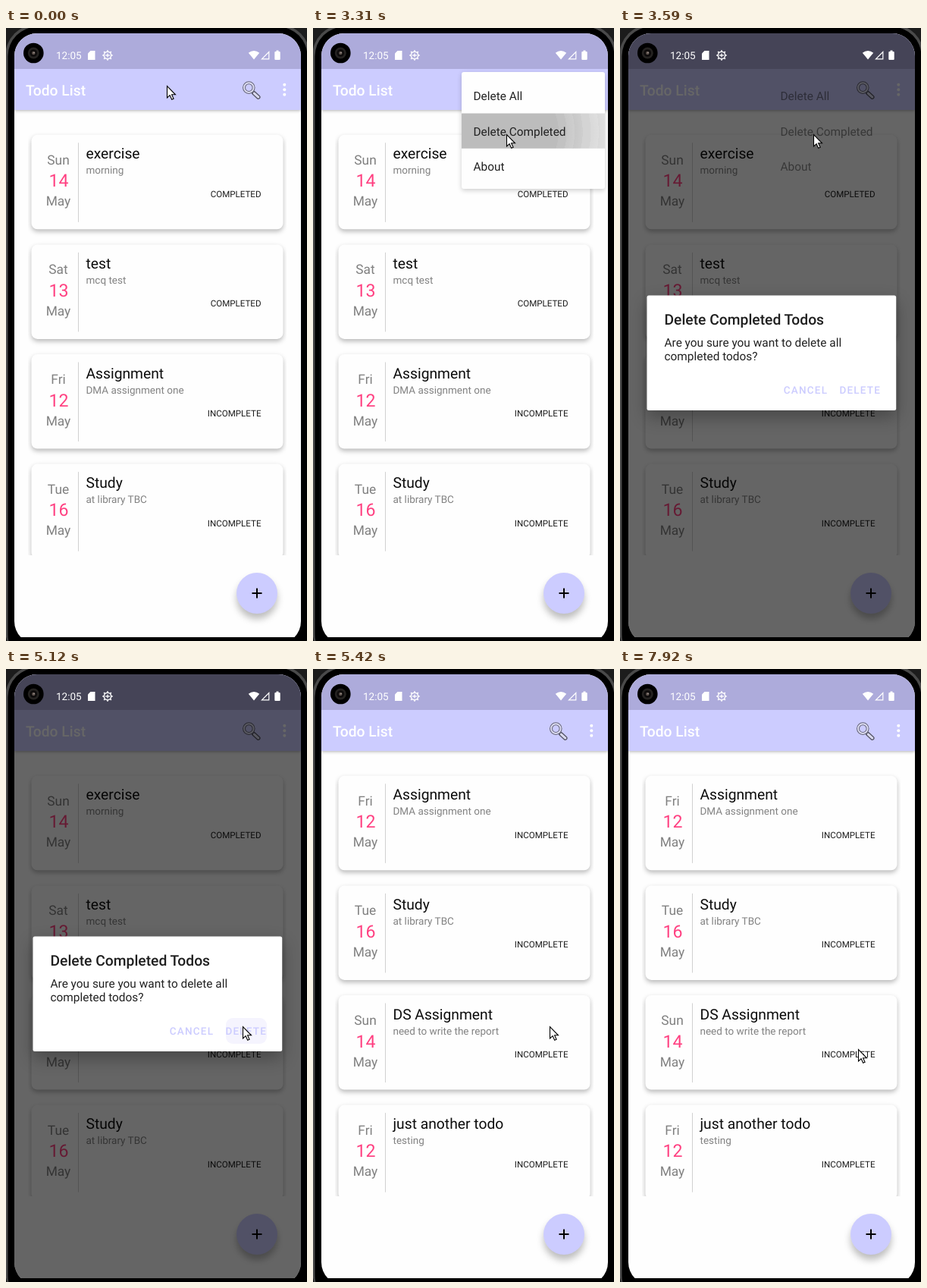
Write an HTML page with a canvas that moves like this. It is 397 by 808 pixels and loops after 8 s.

```html
<!DOCTYPE html>
<html lang="en">
<head>
<meta charset="utf-8">
<title>Todo list</title>
<style>
html, body { margin: 0; width: 100%; height: 100%; overflow: hidden; background: #000; }
canvas { display: block; }
</style>
</head>
<body>
<canvas id="stage" width="397" height="808"></canvas>
<script>
const ctx = document.getElementById('stage').getContext('2d');
const LOOP = 8000;
const SP = 27 / 28; // pixels per density-independent unit
const LAVENDER = '#ccccff';

const before = [
  ['Sun', 14, 'exercise', 'morning', 'COMPLETED'],
  ['Sat', 13, 'test', 'mcq test', 'COMPLETED'],
  ['Fri', 12, 'Assignment', 'DMA assignment one', 'INCOMPLETE'],
  ['Tue', 16, 'Study', 'at library TBC', 'INCOMPLETE']
];
const after = [
  before[2],
  before[3],
  ['Sun', 14, 'DS Assignment', 'need to write the report', 'INCOMPLETE'],
  ['Fri', 12, 'just another todo', 'testing', 'INCOMPLETE']
];

// Each entry: start time, pointer x, pointer y
const pointerSteps = [
  [0, 212, 76], [150, 284, 76], [300, 319, 80], [420, 342, 82], [570, 345, 85],
  [720, 358, 85], [840, 368, 85], [2370, 322, 114], [2490, 283, 135],
  [2640, 255, 140], [3850, 255, 161], [4010, 264, 320], [4140, 277, 455],
  [4290, 302, 467], [4410, 312, 470], [4560, 312, 471], [7760, 312, 480],
  [7920, 314, 501]
];

function text(str, x, y, size, color, { weight = 400, align = 'left', spacing = 0 } = {}) {
  ctx.font = `${weight} ${size * SP}px Roboto, sans-serif`;
  ctx.textRendering = 'geometricPrecision'; // keeps fractional glyph advances
  ctx.letterSpacing = spacing + 'px';
  ctx.textAlign = align;
  ctx.fillStyle = color;
  ctx.fillText(str, x, y);
}

function rect(x, y, w, h, color) {
  ctx.fillStyle = color;
  ctx.fillRect(x, y, w, h);
}

function roundRect(x, y, w, h, r, color) {
  ctx.beginPath();
  ctx.roundRect(x, y, w, h, r);
  ctx.fillStyle = color;
  ctx.fill();
}

function circle(x, y, r, color) {
  ctx.beginPath();
  ctx.arc(x, y, r, 0, Math.PI * 2);
  ctx.fillStyle = color;
  ctx.fill();
}

function line(x1, y1, x2, y2, width, color) {
  ctx.beginPath();
  ctx.moveTo(x1, y1);
  ctx.lineTo(x2, y2);
  ctx.lineWidth = width;
  ctx.strokeStyle = color;
  ctx.stroke();
}

function polygon(points) {
  ctx.beginPath();
  points.forEach(([x, y]) => ctx.lineTo(x, y));
  ctx.closePath();
}

function withState(draw) {
  ctx.save();
  draw();
  ctx.restore();
}

function withShadow(alpha, blur, dy, draw) {
  withState(() => {
    ctx.shadowColor = `rgba(0,0,0,${alpha})`;
    ctx.shadowBlur = blur;
    ctx.shadowOffsetY = dy;
    draw();
  });
}

function drawPhone() {
  rect(0, 0, 397, 808, '#1c1c1c');
  roundRect(-1, -5, 402, 840, 42, '#4a4a4a');
  roundRect(2.5, -1.5, 395, 840, 38.5, '#000');
}

function clipScreen() {
  ctx.beginPath();
  ctx.rect(11, 7, 378, 796);
  ctx.clip();
  ctx.beginPath();
  ctx.roundRect(11, 7, 378, 805, 30);
  ctx.clip();
}

function drawSearchIcon() {
  ctx.translate(0.8, 0.6);
  ctx.lineCap = 'round';
  line(326, 85, 332, 90.5, 5.5, '#555566');
  line(326.5, 85.5, 332, 90.5, 3, '#d9d9ee');
  for (const [width, color] of [[4, '#66667a'], [2, '#dcdcf2']]) {
    ctx.beginPath();
    ctx.arc(319.5, 78, 6.3, 0, Math.PI * 2);
    ctx.lineWidth = width;
    ctx.strokeStyle = color;
    ctx.stroke();
  }
}

function drawCard([day, date, title, note, status], y) {
  withShadow(0.28, 6, 3, () => roundRect(33.5, y, 332, 124.5, 8, '#fefefe'));
  rect(95, y + 10.5, 1, 104.5, '#d0d0d0');
  const centered = { align: 'center' };
  text(day, 69, y + 39, 18, '#808080', centered);
  text(date, 69.5, y + 68.5, 24, '#ff4081', centered);
  text('May', 69, y + 93.5, 18, '#808080', centered);
  text(title, 105.5, y + 31.5, 20, '#0c0c0c');
  text(note, 105.5, y + 51.5, 14, '#828282');
  text(status, 336.5, y + 82, 12, '#1c1c1c', { align: 'right' });
}

function drawApp(todos) {
  rect(11, 7, 378, 796, '#fefefe');
  withState(() => {
    ctx.beginPath();
    ctx.rect(29, 125, 341, 570);
    ctx.clip();
    todos.forEach((todo, i) => drawCard(todo, 140.8 + i * 144.6));
  });
  withShadow(0.3, 4, 1, () => rect(11, 54, 378, 54, LAVENDER));
  rect(11, 7, 378, 47, '#adabdb');
  text('Todo List', 26, 89, 20, '#fff', { weight: 500 });
  withState(drawSearchIcon);
  [74.7, 81.2, 87.7].forEach(y => circle(367.3, y, 2, '#fff'));

  withShadow(0.26, 10, 7, () => circle(331, 745, 27, LAVENDER));
  line(324.5, 745, 337.5, 745, 2, '#000');
  line(331, 738.5, 331, 751.5, 2, '#000');
}

function drawMenuLabels(x, y, color) {
  ['Delete All', 'Delete Completed', 'About'].forEach((label, i) =>
    text(label, x, y + i * 46.3, 16, color));
}

function drawMenuRipple() {
  const rings = ctx.createRadialGradient(258, 137, 0, 258, 137, 132);
  const shades = [188, 194, 200, 206, 212, 217, 222];
  rings.addColorStop(0, 'rgb(188,188,188)');
  shades.forEach((v, i) => {
    const color = `rgb(${v},${v},${v})`;
    rings.addColorStop(0.42 + i * 0.08, color);
    rings.addColorStop(Math.min(1, 0.5 + i * 0.08), color);
  });
  rect(196, 112.5, 189, 46.3, rings);
}

function drawMenu(open, pressed) {
  const [x, y, w, h] = open ? [196, 58, 189, 154] : [233, 57.5, 152.5, 112.5];
  withShadow(0.2, 6, 2, () => roundRect(x, y, w, h, open ? 3 : 0, '#fefefe'));
  withState(() => {
    ctx.beginPath();
    ctx.rect(x, y, w, h);
    ctx.clip();
    if (pressed) drawMenuRipple();
    if (open) drawMenuLabels(211.5, 95.3, '#222');
    else drawMenuLabels(231.2, 74, '#222');
  });
}

function drawDialog(pressed) {
  withShadow(0.3, 22, 9, () => roundRect(35.5, 352.5, 328.7, 151.5, 2.5, '#fff'));
  text('Delete Completed Todos', 58.5, 391, 20, '#1f1f1f', { weight: 500 });
  text('Are you sure you want to delete all', 58.5, 420.3, 16, '#222');
  text('completed todos?', 58.5, 438.3, 16, '#222');
  if (pressed) roundRect(290, 460, 54, 34, 9, '#f5f4fe');
  const button = { weight: 500, spacing: 1.2 };
  text('CANCEL', 215.8, 482.3, 14, LAVENDER, button);
  text('DELETE', 289.5, 482.3, 14, LAVENDER, button);
}

function drawStatusIcons() {
  text('12:05', 66, 41, 14, '#fff');

  ctx.fillStyle = '#fff';
  polygon([[111.5, 30], [117.5, 30], [117.5, 42], [108, 42], [108, 33.5]]);
  ctx.fill();

  ctx.strokeStyle = '#fff';
  ctx.lineWidth = 1.5;
  ctx.beginPath();
  ctx.arc(134, 36, 4.7, 0, Math.PI * 2);
  ctx.stroke();
  for (let i = 0; i < 8; i++) {
    const a = i * Math.PI / 4;
    const c = Math.cos(a), s = Math.sin(a);
    line(134 + c * 5, 36 + s * 5, 134 + c * 6.8, 36 + s * 6.8, 1.7, '#fff');
  }
  line(131, 36, 137, 36, 1.3, '#fff');
  line(134, 33.5, 134, 38.5, 1.3, '#fff');

  ctx.fillStyle = '#fff';
  ctx.beginPath();
  ctx.moveTo(327, 41.5);
  ctx.lineTo(319.8, 32.8);
  ctx.quadraticCurveTo(327, 27, 334.2, 32.8);
  ctx.closePath();
  ctx.fill();

  polygon([[346.8, 31.5], [346.8, 40.8], [337.5, 40.8]]);
  ctx.lineWidth = 1.2;
  ctx.stroke();

  roundRect(354.3, 31, 7.4, 11, 1, '#fff');
  rect(356.5, 29.5, 3, 2, '#fff');
}

function drawCamera() {
  circle(36.3, 33, 13.3, '#000');
  circle(36.3, 33, 7.5, '#252321');
  circle(36.3, 33, 4.8, '#0d0b0b');
  circle(36.3, 33, 2.2, '#5c514b');
  circle(37, 32.5, 0.8, '#b5aaa4');
}

function drawPointer(t) {
  const [, x, y] = pointerSteps.findLast(step => step[0] <= t);
  withState(() => {
    ctx.translate(x + 0.5, y + 0.5);
    polygon([[0, 0], [0, 15.5], [3.6, 12.2], [6.2, 17.8], [8.6, 16.7], [6.1, 11.3], [11, 11.3]]);
    ctx.fillStyle = '#fff';
    ctx.fill();
    ctx.lineWidth = 1.1;
    ctx.strokeStyle = '#000';
    ctx.stroke();
  });
}

// Visibility of the dialog and its scrim, changing in hard steps
function dialogLevel(t) {
  if (t < 3460 || t >= 5420) return 0;
  return t < 3590 || t >= 5270 ? 0.5 : 1;
}

function render(t) {
  const level = dialogLevel(t);
  drawPhone();
  withState(() => {
    clipScreen();
    drawApp(t < 5270 ? before : after);
    if (t >= 1730 && t < 3590) drawMenu(t >= 1880, t >= 3310);
    else if (t >= 3590 && t < 3710) drawMenuLabels(211.5, 95.3, 'rgba(0,0,0,0.45)');
    if (level) {
      rect(11, 7, 378, 796, `rgba(0,0,0,${0.6 * level})`);
      ctx.globalAlpha = level;
      drawDialog(t >= 5120);
    }
  });
  drawStatusIcons();
  drawCamera();
  drawPointer(t);
}

const start = performance.now();
function tick() {
  render((performance.now() - start) % LOOP);
  requestAnimationFrame(tick);
}
tick();
</script>
</body>
</html>
```
